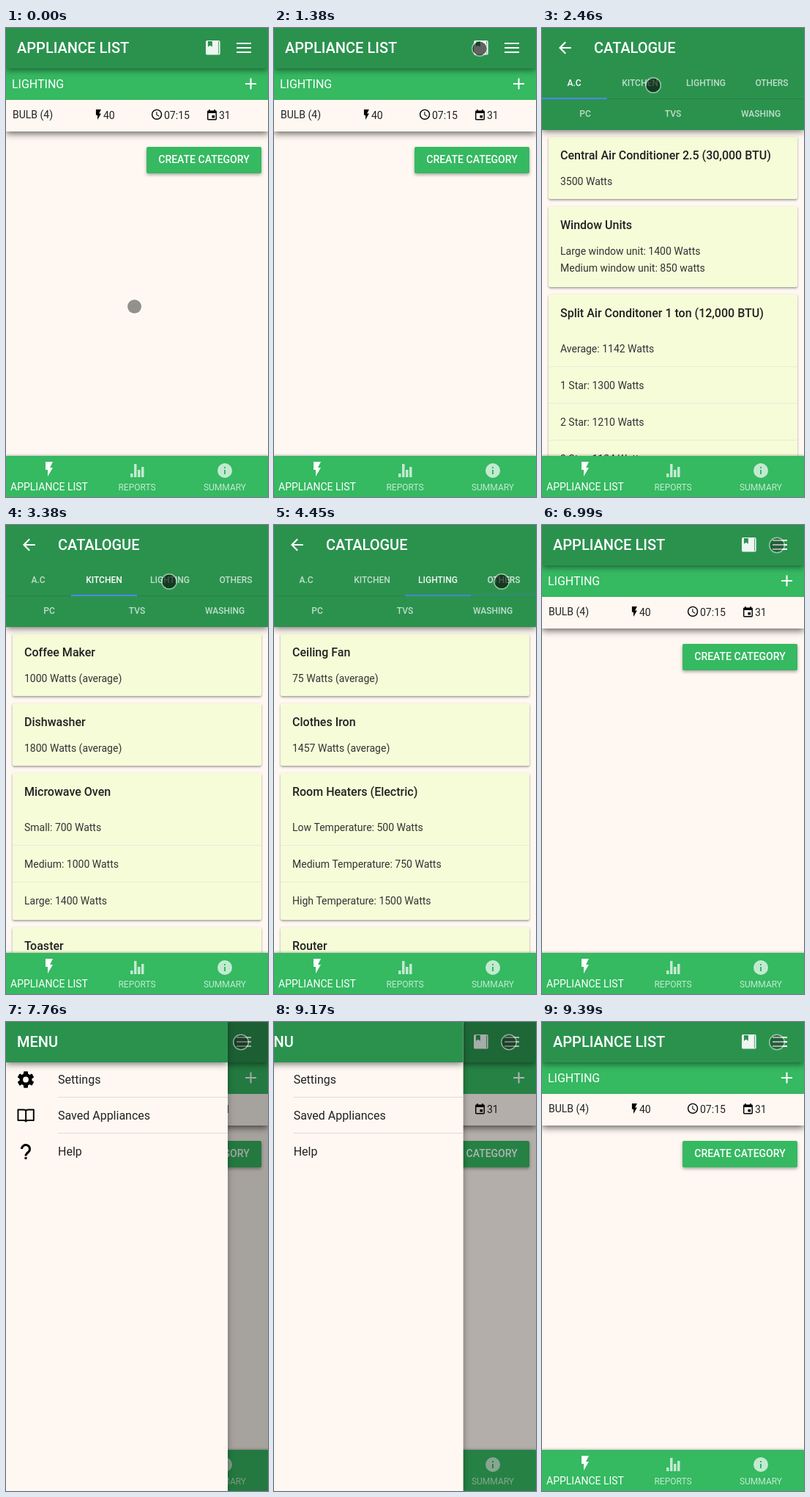
An HTML page with a canvas for the animation above (9790 ms loop, 358 by 639 pixels).

```html
<!DOCTYPE html>
<html lang="en">
<head>
<meta charset="utf-8">
<title>Appliance list</title>
<style>
html, body { margin: 0; width: 100%; height: 100%; overflow: hidden; background: #fff8f2; }
canvas { display: block; width: 358px; height: 639px; }
</style>
</head>
<body>
<canvas id="stage"></canvas>
<script>
const W = 358, H = 639, LOOP = 9790, BAR_Y = 583, MENU_W = 303;
const BG = '#fff8f2', DARK = '#2b924e', GREEN = '#35b961', INK = '#212121';
const DIM = 'rgba(255,255,255,.7)';
const dpr = window.devicePixelRatio || 1;

const stage = document.getElementById('stage');
const layer = document.createElement('canvas');
for (const c of [stage, layer]) {
  c.width = W * dpr;
  c.height = H * dpr;
  c.getContext('2d').scale(dpr, dpr);
}
const main = stage.getContext('2d');
const sheet = layer.getContext('2d');
let g = main;

const ICON = {
  flash: 'M7 2v11h3v9l7-12h-4l4-8z',
  clock: 'M12 2a10 10 0 1 0 0 20a10 10 0 1 0 0-20zM12 20a8 8 0 1 1 0-16a8 8 0 1 1 0 16zM12.5 7H11v6l5.25 3.15.75-1.23-4.5-2.67z',
  event: 'M17 12h-5v5h5zM16 1v2H8V1H6v2H5c-1.1 0-2 .9-2 2v14c0 1.1.9 2 2 2h14c1.1 0 2-.9 2-2V5c0-1.1-.9-2-2-2h-1V1zM19 19H5V8h14z',
  info: 'M12 2a10 10 0 1 0 0 20a10 10 0 1 0 0-20zM13 17h-2v-6h2zM13 9h-2V7h2z',
  back: 'M20 11H7.83l5.59-5.59L12 4l-8 8 8 8 1.41-1.41L7.83 13H20z',
  book: 'M2 0h16a2 2 0 0 1 2 2v16a2 2 0 0 1-2 2H2a2 2 0 0 1-2-2V2a2 2 0 0 1 2-2zM3 1v8l3-2 3 2V1zM17.3 1v18h.8V1z',
  pages: 'M1 1h8q3 0 3 2q0-2 3-2h8v15h-8q-3 0-3 1.5q0-1.5-3-1.5H1zM12 3v14',
  help: 'M1.5 6.5a5.5 5.5 0 1 1 9.3 4q-3.8 3-3.8 5.5'
};
for (const k in ICON) ICON[k] = new Path2D(ICON[k]);

const TABS = [['A.C', 44], ['KITCHEN', 134], ['LIGHTING', 224], ['OTHERS', 314]];
const EDGES = [0, 89, 179, 269, 358];

// Each card: title, lines, and whether the lines form a divided list.
const PAGES = [
  [
    ['Central Air Conditioner 2.5 (30,000 BTU)', ['3500 Watts']],
    ['Window Units', ['Large window unit: 1400 Watts', 'Medium window unit: 850 watts']],
    ['Split Air Conditoner 1 ton (12,000 BTU)',
      ['Average: 1142 Watts', '1 Star: 1300 Watts', '2 Star: 1210 Watts', '3 Star: 1124 Watts'], true]
  ],
  [
    ['Coffee Maker', ['1000 Watts (average)']],
    ['Dishwasher', ['1800 Watts (average)']],
    ['Microwave Oven', ['Small: 700 Watts', 'Medium: 1000 Watts', 'Large: 1400 Watts'], true],
    ['Toaster', ['1100 Watts (average)']]
  ],
  [
    ['Tube Light', ['40 Watts (average)']],
    ['Night Lamp', ['15 Watts (average)']],
    ['Bulb', ['LED: 9 Watts', 'CFL: 15 Watts', 'Incandescent: 60 Watts'], true],
    ['Flood Light', ['100 Watts (average)']]
  ],
  [
    ['Ceiling Fan', ['75 Watts (average)']],
    ['Clothes Iron', ['1457 Watts (average)']],
    ['Room Heaters (Electric)',
      ['Low Temperature: 500 Watts', 'Medium Temperature: 750 Watts', 'High Temperature: 1500 Watts'], true],
    ['Router', ['6 Watts (average)']]
  ]
];

// Start, end, steps, then where the pointer arrives and how far its path bows.
const MOVES = [
  [300, 1070, 11, 281, 28, 0],
  [2000, 2460, 7, 152, 78, 0],
  [2990, 3380, 6, 223, 77, 0],
  [3990, 4220, 4, 311, 77, 0],
  [4760, 5610, 12, 39, 30, 0],
  [6530, 6990, 7, 321, 27.5, -9]
];
const SWITCHES = [[2690, 2840, 3], [3760, 3910, 3], [4450, 4530, 2]];

// Stepped progress: the first step lands at start, the last at end.
function steps(t, start, end, n) {
  const i = Math.floor((t - start + 3) / (end - start) * (n - 1)) + 1;
  return Math.min(Math.max(t < start ? 0 : i, 0), n) / n;
}
const inOut = p => (1 - Math.cos(Math.PI * p)) / 2;
const out = p => 1 - (1 - p) ** 2.5;

function rect(x, y, w, h, fill) {
  g.fillStyle = fill;
  g.fillRect(x, y, w, h);
}

function shadowed(blur, dy, alpha, draw) {
  g.save();
  g.shadowColor = `rgba(0,0,0,${alpha})`;
  g.shadowBlur = blur * dpr;
  g.shadowOffsetY = dy * dpr;
  draw();
  g.restore();
}

function box(x, y, w, h, r, fill) {
  g.fillStyle = fill;
  g.beginPath();
  g.roundRect(x, y, w, h, r);
  g.fill();
}

function disc(x, y, r, fill) {
  g.fillStyle = fill;
  g.beginPath();
  g.arc(x, y, r, 0, 7);
  g.fill();
}

function text(s, x, y, size, fill, weight = 400, align = 'left') {
  g.font = `${weight} ${size}px Roboto, sans-serif`;
  g.textAlign = align;
  g.fillStyle = fill;
  g.fillText(s, x, y);
}

function icon(name, x, y, scale, color, stroke) {
  g.save();
  g.translate(x, y);
  g.scale(scale, scale);
  if (stroke) {
    g.strokeStyle = color;
    g.lineWidth = stroke;
    g.lineJoin = 'round';
    g.stroke(ICON[name]);
  } else {
    g.fillStyle = color;
    g.fill(ICON[name], 'evenodd');
  }
  g.restore();
}

function header(w, h) {
  shadowed(9, 2, .55, () => rect(0, 0, w, h, DARK));
}

function drawList(ripple) {
  rect(0, 0, W, H, BG);
  shadowed(9, 3, .6, () => rect(0, 55, W, 86, BG));
  rect(0, 55, W, 43, GREEN);
  header(W, 55);
  text('APPLIANCE LIST', 15, 34, 20, '#fff', 500);
  if (ripple) disc(282, 27, 24 * ripple, 'rgba(255,255,255,.12)');
  icon('book', 273, 17, .98, 'rgba(255,255,255,.92)');
  for (const y of [20, 26, 32]) rect(315, y, 20, 2, '#fff');

  text('LIGHTING', 8, 82, 16, '#fff');
  rect(327, 75, 15, 2, '#fff');
  rect(333.5, 68.5, 2, 15, '#fff');

  text('BULB (4)', 9, 123, 14, INK);
  icon('flash', 118, 109.6, .7, '#000');
  text('40', 133, 124, 14, INK);
  icon('clock', 197.4, 109.2, .72, '#000');
  text('07:15', 216, 124, 14, INK);
  icon('event', 272.8, 110.3, .72, '#000');
  text('31', 291, 124, 14, INK);

  shadowed(4, 2, .35, () => box(192, 162, 157, 36, 2, GREEN));
  text('CREATE CATEGORY', 270.5, 184, 14, '#fff', 500, 'center');
}

function drawCard([title, lines, list], y) {
  const h = list ? 50 + lines.length * 50 : 62 + lines.length * 23 + (lines.length > 1 ? 2 : 0);
  shadowed(3, 1.5, .4, () => box(9, y, 340, h, 2, '#f6fcd8'));
  text(title, 25, y + 31, 16, INK, 500);
  lines.forEach((s, i) => {
    text(s, 25, y + (list ? 79 + i * 50 : 66 + i * 23), 14, '#333');
    if (list && i) rect(9, y + 48 + i * 50, 340, 1, '#e8ebd8');
  });
  return y + h + 10;
}

function tabState(t) {
  let tab = 0, fade = 1;
  SWITCHES.forEach((s, i) => {
    if (t >= s[0]) {
      tab = i + 1;
      fade = steps(t, ...s) ** 2;
    }
  });
  return [tab, fade];
}

function drawCatalogue(t) {
  const [tab, fade] = tabState(t);
  rect(0, 0, W, H, BG);
  PAGES[tab].reduce((y, card) => drawCard(card, y), 148);
  header(W, 139);
  icon('back', 18.8, 14.4, 1.05, '#fff');
  text('CATALOGUE', 71, 34, 20, '#fff', 500);
  rect(0, 96, W, 1, 'rgba(0,0,0,.12)');
  TABS.forEach(([name, x], i) => {
    const on = i === tab ? fade : i === tab - 1 ? 1 - fade : 0;
    text(name, x, 79, 12, `rgba(255,255,255,${.7 + .3 * on})`, 500, 'center');
    if (on) rect(EDGES[i], 95, EDGES[i + 1] - EDGES[i], 2, `rgba(72,138,255,${on})`);
  });
  [['PC', 59], ['TVS', 179], ['WASHING', 299]].forEach(
    ([name, x]) => text(name, x, 121, 12, DIM, 500, 'center'));
}

function drawBar() {
  shadowed(3, -1, .25, () => rect(0, BAR_Y, W, H - BAR_Y, GREEN));
  icon('flash', 47, 589, 1, '#fff');
  text('APPLIANCE LIST', 59, 630, 14, '#fff', 400, 'center');
  [[170, 5], [175, 18], [180, 10], [185, 14]].forEach(
    ([x, h]) => rect(x, 612 - h, 3.5, h, DIM));
  text('REPORTS', 179, 630, 12, DIM, 400, 'center');
  icon('info', 287, 591, 1, DIM);
  text('SUMMARY', 299, 630, 12, DIM, 400, 'center');
}

function drawGear(x, y) {
  g.save();
  g.translate(x, y);
  g.beginPath();
  g.arc(0, 0, 6.2, 0, 7);
  g.strokeStyle = '#000';
  g.lineWidth = 4.6;
  g.stroke();
  for (let i = 0; i < 6; i++) {
    box(-3, -11.3, 6, 4.5, 1, '#000');
    g.rotate(Math.PI / 3);
  }
  g.restore();
}

function drawMenu(open) {
  rect(0, 0, W, H, `rgba(0,0,0,${.35 * open})`);
  g.save();
  g.translate(MENU_W * (open - 1), 0);
  shadowed(8, 0, .35, () => rect(0, 0, MENU_W, H, BG));
  g.beginPath();
  g.rect(0, 0, MENU_W, H);
  g.clip();
  header(MENU_W, 55);
  text('MENU', 15, 34, 20, '#fff', 500);
  drawGear(27, 78.5);
  icon('pages', 15.5, 118.5, .97, '#000', 2);
  icon('help', 20, 166.5, 1, '#000', 3);
  rect(25.5, 184, 3, 3, '#000');
  ['Settings', 'Saved Appliances', 'Help'].forEach((s, i) => {
    text(s, 71, 84 + 49 * i, 16, INK);
    if (i < 2) rect(71, 102 + 49 * i, MENU_W - 71, 1, '#dfdad5');
  });
  g.restore();
}

function drawPointer(t) {
  let x = 175.5, y = 379.5;
  for (const [start, end, n, tx, ty, bow] of MOVES) {
    const p = inOut(steps(t, start, end, n));
    x += (tx - x) * p;
    y += (ty - y) * p + bow * Math.sin(Math.PI * p);
  }
  const alpha = t < 1380 ? .42 : t < 6530 ? .6 : .32;
  disc(x, y, 9.6, `rgba(0,0,0,${alpha})`);
  g.beginPath();
  g.arc(x, y, 10.3, 0, 7);
  g.strokeStyle = 'rgba(255,255,255,.5)';
  g.lineWidth = 1.4;
  g.stroke();
}

function draw(t) {
  const tap = steps(t, 1380, 1840, 7) * 7;
  const enter = out(Math.max(0, tap - 3) / 4);
  const leave = steps(t, 6070, 6300, 4);
  const shown = enter * (1 - leave);
  const open = out(steps(t, 7450, 7760, 5)) * (1 - inOut(steps(t, 9170, 9390, 4)));

  if (shown < 1) drawList(tap < 7 ? Math.min(1, tap / 3) : 0);
  if (shown > 0) {
    g = sheet;
    drawCatalogue(t);
    g = main;
    g.save();
    g.beginPath();
    g.rect(0, 0, W, BAR_Y);
    g.clip();
    g.globalAlpha = shown;
    g.drawImage(layer, 0, 40 * (1 - shown), W, H);
    g.restore();
  }
  drawBar();
  if (open > 0) drawMenu(open);
  drawPointer(t);
}

const t0 = performance.now();
function tick() {
  draw((performance.now() - t0) % LOOP);
  requestAnimationFrame(tick);
}
tick();
</script>
</body>
</html>
```
